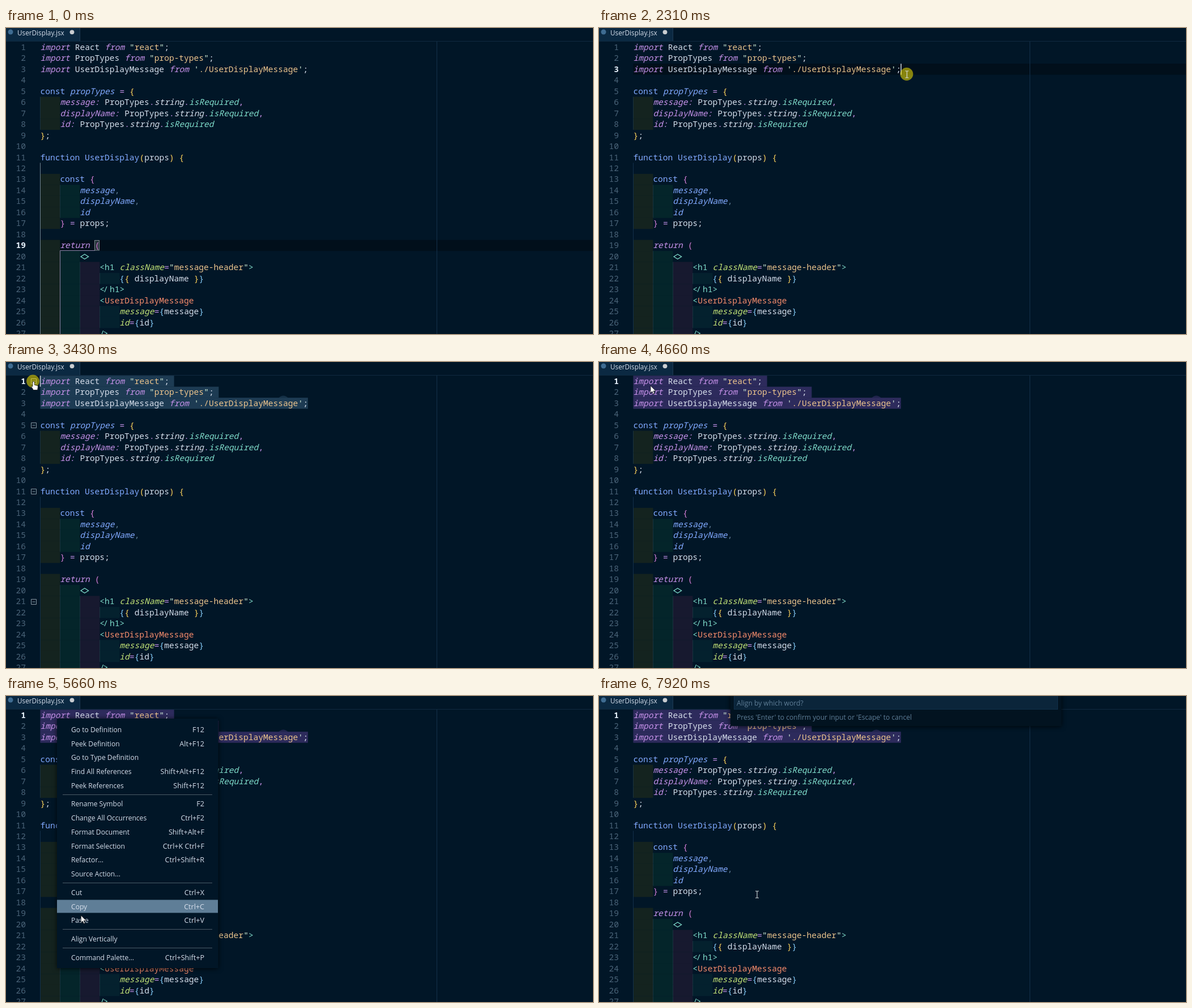
Write an HTML page that moves like this. It is 1036 px wide and 541 px high and loops after 8000 ms.

```html
<!DOCTYPE html>
<html lang="en">
<head>
<meta charset="utf-8">
<title>Editor: align vertically</title>
<style>
html, body { margin: 0; width: 100%; height: 100%; overflow: hidden; background: #011627; }
svg { display: block; width: 100vw; height: 100vh; }
text { white-space: pre; }
.code { font: 14.58px "Noto Sans Mono", "DejaVu Sans Mono", monospace; font-variant-ligatures: none; }
.ui { font: 12.1px "Open Sans", "Noto Sans", sans-serif; fill: #d6deeb; }
.key { font-size: 12.6px; text-anchor: end; }
.num { text-anchor: end; fill: #4b6479; }
.num.on { fill: #e4eef8; font-weight: 600; }
.shadow { filter: drop-shadow(0 1px 4px rgba(0, 0, 0, .75)); }
</style>
</head>
<body>
<svg id="stage" viewBox="0 0 1036 541" preserveAspectRatio="none"></svg>
<script>
const NS = "http://www.w3.org/2000/svg";
const stage = document.getElementById("stage");
const LEFT = 60.4, CHAR = 8.75, ROW = 19.47, TOP = 24.2, LOOP = 8000;

function add(parent, tag, attrs = {}, text) {
  const el = document.createElementNS(NS, tag);
  for (const k in attrs) el.setAttribute(k, attrs[k]);
  if (text !== undefined) el.textContent = text;
  parent.appendChild(el);
  return el;
}
const group = (parent = stage) => add(parent, "g");
const box = (parent, x, y, width, height, fill) => add(parent, "rect", { x, y, width, height, fill });
const path = (parent, d, attrs) => add(parent, "path", { d, fill: "none", ...attrs });
const show = (el, on) => el.setAttribute("visibility", on ? "visible" : "hidden");
const colX = c => LEFT + c * CHAR;
const rowY = n => TOP + (n - 1) * ROW;

// Each token is "~", a style letter, then its text.
const STYLES = {
  k: ["#c792ea", 1], w: ["#d6deeb"], i: ["#d6deeb", 1], s: ["#ecc48d"], q: ["#d9f5dd"],
  f: ["#82aaff"], v: ["#82aaff", 1], g: ["#ffd45c"], o: ["#d67fd8"], p: ["#c792ea"],
  r: ["#7fdbca", 1], d: ["#5f7e97"], t: ["#7fdbca"], l: ["#7fdbca"], a: ["#c5e478", 1],
  b: ["#87cefa"], c: ["#f78c6c"]
};
const prop = (name, end) => `~k    ${name}:~w PropTypes~p.~istring~p.~risRequired~p${end}`;
const LINES = [
  '~kimport~w React~k from~q "~sreact~q"~w;',
  '~kimport~w PropTypes~k from~q "~sprop-types~q"~w;',
  "~kimport~w UserDisplayMessage~k from~q '~s./UserDisplayMessage~q'~w;",
  "",
  "~fconst~v propTypes~p =~g {",
  prop("message", ","), prop("displayName", ","), prop("id", ""),
  "~g}~w;",
  "",
  "~ffunction UserDisplay~g(~wprops~g) {",
  "",
  "~f    const~o {",
  "~v        message~d,", "~v        displayName~d,", "~v        id",
  "~o    }~p =~w props;",
  "",
  "~k    return~o (",
  "",
  '~t            <h1~a className~p=~q"~smessage-header~q"~t>',
  "~b                {~g{~w displayName~g }~b}",
  "~t            <~l/~th1>",
  "~t            <~cUserDisplayMessage",
  "~a                message~p=~b{~wmessage~b}",
  "~a                id~p=~b{~wid~b}",
  "~t            /~l>"
];
const DEPTH = n => n >= 6 && n <= 8 ? 1 : n >= 14 && n <= 16 ? 2 : n === 13 || n === 17 || n === 19 ? 1
  : n === 20 ? 2 : n === 22 || n === 25 || n === 26 ? 4 : n > 20 ? 3 : 0;
const TINTS = ["#14231f", "#04252a", "#17192f", "#04212e"];

box(stage, 0, 0, 1036, 541, "#011627");
const rowMark = box(stage, LEFT, 0, 976, ROW, "#010f1b");

const indent = group();
for (let n = 1; n <= 27; n++) {
  for (let d = 0; d < DEPTH(n); d++) {
    box(indent, colX(d * 4), rowY(n), CHAR * 4, ROW + .1, TINTS[d]);
    box(indent, colX(d * 4) - .4, rowY(n), 1, ROW, "#19323f");
  }
}
box(indent, 60, rowY(12), 1, 302, "#12304a");
box(stage, 760, 24, 1, 517, "#14304a");

// Guides and bracket box around the opening parenthesis.
const bracket = group();
box(bracket, 60, rowY(12), 1, 303, "#6f8290");
path(bracket, `M157 393.5H95.5V541`, { stroke: "#8b83a6" });
add(bracket, "rect", { x: 156.5, y: 375.5, width: 8, height: 17.5, fill: "#26343a", stroke: "#7d8a90" });

const bump = path(stage, "M481 63.5q8.5-8 17 0z", { fill: "#1d3b53", opacity: .7 });
const selection = [1, 2, 3].map(n => box(stage, LEFT, rowY(n), 0, ROW + .1, "#1d3b53"));
const ENDS = [27, 36, 54];

const numbers = LINES.map((line, i) => {
  const y = rowY(i + 1) + 14.6;
  const code = add(stage, "text", { y, class: "code" });
  let col = 0;
  for (const token of line.split("~").slice(1)) {
    const [fill, italic] = STYLES[token[0]], body = token.slice(1);
    add(code, "tspan", {
      x: colX(col) - (token[0] === "l" ? 2.6 : 0), fill,
      "font-style": italic ? "italic" : "normal"
    }, body);
    col += body.length;
  }
  return add(stage, "text", { x: 35, y, class: "code num" }, i + 1);
});
path(stage, "M132 404.3L138.8 400L145.6 404.3L138.8 408.6Z", { stroke: "#7fdbca", "stroke-width": 1.3 });

const folds = group();
for (const n of [1, 5, 11, 21]) {
  const y = Math.round(rowY(n) + 5) + .5;
  path(folds, `M44.5 ${y}h9v9h-9zM46.5 ${y + 4.5}h5`, { stroke: "#8795a1" });
}
const caret = box(stage, 0, 0, 1.6, ROW, "#c3ccd4");

// Tab strip
box(stage, 0, 0, 1036, 23, "#011627");
box(stage, 0, 23, 1036, 1, "#10293f");
box(stage, 0, 0, 130, 23, "#0b2942");
box(stage, 130, 0, 1, 23, "#1d3a52");
add(stage, "circle", { cx: 8, cy: 7, r: 4.5, fill: "#3f6c92" });
add(stage, "text", { x: 20, y: 12.5, class: "ui", style: "font-size:11.75px" }, "UserDisplay.jsx");
add(stage, "circle", { cx: 116.5, cy: 7.3, r: 3.9, fill: "#c9cdd1" });

// Context menu; null is a separator.
const ITEMS = [
  ["Go to Definition", "F12"], ["Peek Definition", "Alt+F12"], ["Go to Type Definition", ""],
  ["Find All References", "Shift+Alt+F12"], ["Peek References", "Shift+F12"], null,
  ["Rename Symbol", "F2"], ["Change All Occurrences", "Ctrl+F2"], ["Format Document", "Shift+Alt+F"],
  ["Format Selection", "Ctrl+K Ctrl+F"], ["Refactor...", "Ctrl+Shift+R"], ["Source Action...", ""], null,
  ["Cut", "Ctrl+X"], ["Copy", "Ctrl+C"], ["Paste", "Ctrl+V"], null,
  ["Align Vertically", ""], null, ["Command Palette...", "Ctrl+Shift+P"]
];
const menu = group();
box(menu, 90, 40, 284.5, 441, "#011627").setAttribute("class", "shadow");
const hover = box(menu, 90, 0, 284, 23, "#5f7e97");
const centers = [];
let itemY = 59.6;
for (const item of ITEMS) {
  if (!item) {
    box(menu, 100, Math.round(itemY - 9.5), 264, 1, "#4c5a66");
    itemY += 7.9;
    continue;
  }
  add(menu, "text", { x: 115, y: itemY + 4.2, class: "ui" }, item[0]);
  add(menu, "text", { x: 350, y: itemY + 4.2, class: "ui key" }, item[1]);
  centers.push(itemY);
  itemY += 24.75;
}

// Prompt
const prompt = group();
box(prompt, 232, -6, 584, 59, "#021320").setAttribute("class", "shadow");
add(prompt, "rect", { x: 238.5, y: -3.5, width: 571, height: 27, fill: "#0b253a", stroke: "#10304a" });
const hint = { class: "ui", style: "fill:#5f7e97" };
add(prompt, "text", { x: 243, y: 16.6, ...hint }, "Align by which word?");
add(prompt, "text", { x: 243, y: 42, ...hint }, "Press 'Enter' to confirm your input or 'Escape' to cancel");
const promptCaret = box(prompt, 243, 3, 1, 18, "#d6deeb");

// Pointer
const mouse = group();
const halo = add(mouse, "circle", { cx: -.5, cy: -.5, r: 11.4, fill: "#ffeb00", opacity: .53 });
const beam = path(mouse, "M-3-6H-1L0-5.5L1-6H3M0-5.5V5.5M-3 6H-1L0 5.5L1 6H3", { stroke: "#d8dcdc", "stroke-width": 1.1 });
const outline = { fill: "#fff", stroke: "#111", "stroke-width": .7 };
const arrow = path(mouse, "M0 0V12.6L3 9.9L5 14.5L7 13.6L5 9.2H9Z", outline);
const hand = path(mouse, "M-1 1.5a1.6 1.6 0 0 1 3.2 0V6l5 1.2q1.5.4 1.3 2L7.6 15H.4L-3 9.6q-.6-1.9.9-1.6L-1 9z", outline);

// Start, end, target x and y, ease
const smooth = u => u * u * (3 - 2 * u);
const out = u => 1 - (1 - u) * (1 - u);
const MOVES = [
  [280, 660, 568, 240, out], [980, 1760, 543.5, 82, smooth], [2480, 2770, 183, 15, smooth],
  [3000, 3400, 48, 34.5, smooth], [4030, 4410, 91, 42, smooth], [5140, 5830, 135, 410, out],
  [6360, 6680, 135, 426.5, smooth], [7610, 7920, 279, 351, smooth]
];
function pointer(t) {
  let x = 907, y = 479;
  for (const [t0, t1, tx, ty, ease] of MOVES) {
    if (t <= t0) break;
    const u = ease(Math.min(1, (t - t0) / (t1 - t0)));
    x += (tx - x) * u;
    y += (ty - y) * u;
  }
  return [x, y];
}
const within = (t, a, b) => t >= a && t < b;
const clamp = (v, a, b) => Math.max(a, Math.min(b, v));

function draw(t) {
  const [x, y] = pointer(t);
  const dragged = t >= 2480;

  // Text cursor follows the drag until it reaches the line start.
  let line = 19, col = 12;
  if (t >= 2180) {
    const [dx, dy] = pointer(Math.min(t, 3700));
    line = clamp(Math.floor((dy - TOP) / ROW) + 1, 1, 3);
    col = clamp(Math.round((dx - LEFT) / CHAR), 0, line === 3 ? 54 : ENDS[line - 1] - 1);
  }
  const selected = dragged && !(line === 3 && col === 54);
  const tone = t >= 4600 ? "#2d2b5c" : "#1d3b53";
  selection.forEach((bar, i) => {
    const from = i + 1 === line ? col : 0;
    bar.setAttribute("x", colX(from));
    bar.setAttribute("width", (ENDS[i] - from) * CHAR);
    bar.setAttribute("fill", tone);
    show(bar, selected && i + 1 >= line);
  });
  show(bump, selected && t >= 2770);
  bump.setAttribute("fill", tone);

  numbers.forEach((el, i) => el.setAttribute("class", "code num" + (i + 1 === line ? " on" : "")));
  rowMark.setAttribute("y", rowY(line));
  show(rowMark, !selected);
  show(bracket, t < 2180);
  caret.setAttribute("x", colX(col) - .6);
  caret.setAttribute("y", rowY(line));
  show(caret, within(t, 2180, 4100));

  const foldFade = t < 4030 ? (t - 3220) / 180 : (4410 - t) / 250;
  folds.setAttribute("opacity", clamp(foldFade, 0, 1));

  // Menu highlight trails the pointer slightly.
  const hy = pointer(t - 60)[1];
  const hit = centers.find(c => Math.abs(c - hy) < 11.5);
  const menuOpen = within(t, 4730, 7130);
  show(menu, menuOpen);
  show(hover, menuOpen && hit !== undefined);
  if (hit !== undefined) hover.setAttribute("y", hit - 12);

  show(prompt, t >= 7210);
  show(promptCaret, within(t, 7210, 7740));

  mouse.setAttribute("transform", `translate(${x} ${y})`);
  const onHand = within(t, 3000, 4410) && x < 58;
  const onArrow = within(t, 4600, 7130);
  show(halo, within(t, 2180, 3710) || within(t, 6980, 7130));
  show(hand, onHand);
  show(arrow, onArrow);
  show(beam, t >= 280 && !onHand && !onArrow);
}

const start = performance.now();
function frame() {
  draw((performance.now() - start) % LOOP);
  requestAnimationFrame(frame);
}
frame();
</script>
</body>
</html>
```
